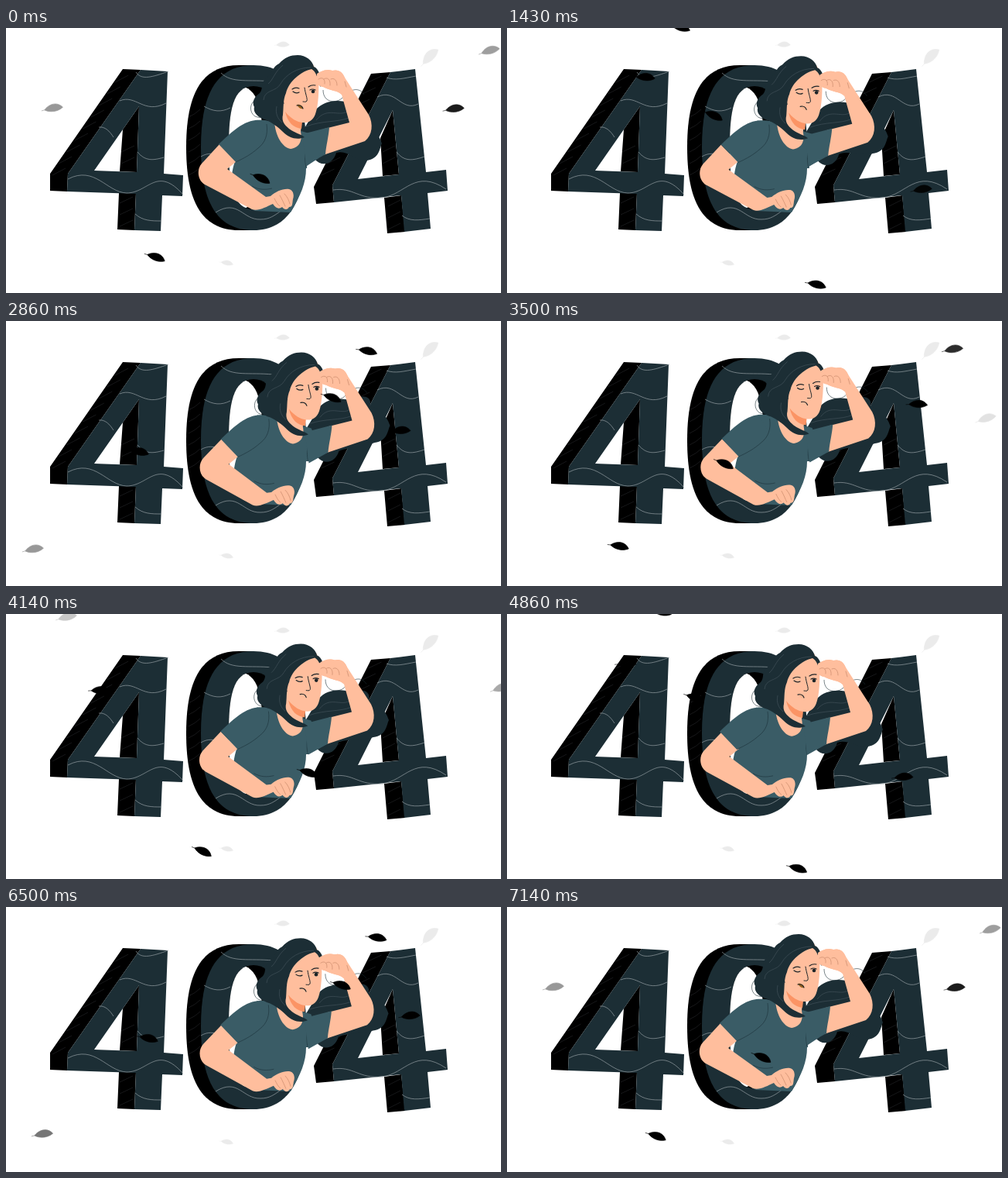
Recreate the animation shown at these times as an HTML page. Size 640x342 px, loop 7210 ms.

```html
<!DOCTYPE html>
<html lang="en">
<head>
<meta charset="utf-8">
<title>404</title>
<style>
html, body { margin: 0; width: 100%; height: 100%; overflow: hidden; background: #fff; }
svg { display: block; width: 640px; height: 342px; }
.front { fill: #1c2e35; }
.wave { fill: none; stroke: #95a0a4; stroke-width: .7; }
.grain { fill: none; stroke: #25282a; stroke-width: .6; }
.shirt { fill: #3a5c66; }
.skin { fill: #ffbe9d; }
.fold { fill: none; stroke: #20373f; stroke-width: .7; }
.crease { fill: none; stroke: #c98a6c; stroke-width: .7; stroke-linecap: round; }
.ink { fill: none; stroke: #1c2428; stroke-width: 1.2; stroke-linecap: round; }
.wisp { fill: none; stroke: #1c2e35; stroke-width: .6; }
.strand { fill: none; stroke: #47575e; stroke-width: .6; }
.pale { fill: #ebebeb; stroke: #ebebeb; }
</style>
</head>
<body>
<svg viewBox="0 0 640 342">
  <defs>
    <path id="leaf" d="M-16,2L-12,1.5C-6,-5 5,-8 12,1C5,6 -5,6 -12,1.5" stroke-width=".6"/>
    <path id="oval" d="M320,48C372,48 388,92 388,154C388,217 368,261 320,261C268,261 252,217 252,154C252,92 268,48 320,48Z"/>
    <path id="hole" d="M320,75C347,75 352,108 352,154C352,202 347,234 320,234C293,234 288,202 288,154C288,108 293,75 320,75Z"/>
    <clipPath id="inside"><use href="#hole"/></clipPath>
    <clipPath id="waist"><path d="M240,90H440V180L388,181C388,200 381,216 368,238L322,236C300,225 290,205 288,172H240Z"/></clipPath>
  </defs>

  <g class="pale">
    <use href="#leaf" transform="translate(358 21) scale(.7)"/>
    <use href="#leaf" transform="translate(548 36) rotate(-42) scale(1.1 1.25)"/>
    <use href="#leaf" transform="translate(286 303) rotate(12) scale(.65)"/>
  </g>

  <g id="left4">
    <path d="M151,53L174,54L80,188L79,211L57,210V188Z M151,131L172,101L169,186L147,185Z M146,213H168L166,261L144,260Z"/>
    <path class="front" fill-rule="evenodd" d="M174,54L209,56L204,188L229,190L228,217L202,216L200,262L166,261L168,214L79,211L80,188Z M172,101L114,184L169,186Z"/>
    <path class="wave" d="M168,57C175,68 190,63 210,56M147,94C168,85 178,112 207,97M120,128C128,127 134,133 139,141M170,160C180,172 190,171 204,167M80,195C115,177 130,212 156,213C184,213 195,177 229,215M167,240C177,249 188,249 201,249"/>
  </g>

  <g id="zero">
    <use href="#oval" x="-19"/>
    <path d="M301,48H320V261H301Z"/>
    <use href="#oval" class="front"/>
    <use href="#hole"/>
    <g clip-path="url(#inside)"><use href="#hole" x="-20" fill="#fff"/></g>
    <path class="wave" d="M278,58C292,72 314,66 345,69M256,101C268,108 278,109 290,103M252,166C260,161 270,161 277,166M271,238C300,220 306,248 329,247C341,247 347,242 357,235"/>
  </g>

  <g id="right4">
    <path d="M472,59L497,57L422,203L424,225L401,227L398,205Z M484,142L500,106L508,189L487,191Z M489,219L511,216L516,263L493,265Z"/>
    <path class="front" fill-rule="evenodd" d="M497,57L529,53L543,186L569,183L571,210L545,213L549,259L515,263L511,216L424,225L422,203Z M500,106L455,195L508,189Z"/>
    <path class="wave" d="M492,64C503,68 514,65 530,62M480,89C504,77 511,109 533,98M505,160C515,173 526,171 541,166M423,209C449,205 456,222 487,219C516,215 529,181 569,208M512,242C522,250 534,248 548,246"/>
  </g>
  <path id="grain" class="grain"/>

  <path id="tail" class="front"/>
  <path id="tailLines" class="strand"/>
  <path id="curl" class="wisp"/>

  <g clip-path="url(#waist)">
    <g data-part="torso">
      <path class="shirt" d="M322,119C334,118 344,120 350,124L392,136L404,168L389,178V255H294C291,225 288,195 296,172Z"/>
      <path class="fold" d="M318,204C327,209 335,209 344,207M389,150C386,163 386,171 388,180"/>
    </g>
  </g>
  <g data-part="arm">
    <path class="skin" d="M412,130L444,122L434,86C428,80 418,81 410,76C403,75 401,70 402,66C399,60 403,57 408,57C412,53 418,54 422,55C430,53 435,57 438,64L469,112C475,124 474,138 464,146L410,164Z"/>
    <path class="shirt" d="M383,137L418,128C417,141 414,151 413,163L388,177Z"/>
  </g>
  <g data-part="torso">
    <path class="skin" d="M357,96L383,114L381,134C384,148 377,155 368,156C357,154 349,140 347,122Z"/>
  </g>
  <g data-part="low">
    <path class="skin" d="M276,150L253,175C246,183 248,197 257,202L318,234C326,237 336,231 345,227C349,233 353,234 357,231C360,235 364,235 366,231C371,231 370,226 371,221C373,215 371,209 366,208C358,207 349,211 342,217L336,218L286,182L298,172Z"/>
    <path class="crease" d="M347,220C349,224 351,228 354,230M354,216C357,221 359,226 361,230M360,214C364,218 366,223 367,227"/>
  </g>
  <g data-part="torso">
    <path class="shirt" d="M323,119C304,121 289,137 275,150L297,173C311,167 328,157 338,145Z"/>
    <path class="fold" d="M337,124C339,138 335,148 326,155C317,163 308,168 297,173"/>
  </g>
  <g data-part="head">
    <path class="wisp" d="M328,91C315,93 313,108 322,114C329,117 335,114 340,118"/>
    <path fill="#fb9465" d="M361,108C368,117 376,121 383,121L382,130C372,129 364,122 361,108Z"/>
    <path class="skin" d="M397,47L404,60C405,80 404,100 400,111C396,123 385,124 376,120C367,116 359,104 358,88C358,68 374,50 397,47Z"/>
    <path class="front" d="M377,35C388,35 396,42 398,50C404,52 408,62 407,76L404,72C403,62 400,56 395,53C382,56 366,68 362,84C358,92 359,104 358,112C356,120 360,125 366,130C374,136 380,136 386,141C376,145 366,142 358,134C351,127 345,123 337,119C326,116 319,109 321,102C317,95 322,88 328,84C333,78 329,72 335,66C345,59 344,50 353,46C360,38 368,35 377,35Z"/>
    <path class="strand" d="M394,51C376,51 362,60 355,72C349,83 334,79 333,93M358,48C347,57 346,66 339,72M350,101C348,110 351,117 357,122"/>
    <path class="ink" d="M370,79Q374,76 379,78M391,76Q395,73 400,74M371,82Q375,85 379,83M393,80Q396,78 400,80"/>
    <circle cx="397" cy="82" r="2.3" fill="#1c2428"/>
    <path class="ink" style="stroke-width:1" d="M386,77C387,85 390,91 389,94C388,96 386,95 384,95"/>
    <path id="lips" fill="#96611f" d="M376,99C380,98 384,101 384,104C380,105 378,102 376,99Z"/>
    <path class="ink" d="M376,100C380,99 383,101 384,104"/>
  </g>
  <g data-part="arm">
    <path class="skin" d="M402,59C408,55 414,53 422,55C430,53 435,57 438,64L439,76L434,86C428,80 418,81 410,76C403,75 401,70 402,66Z"/>
    <path class="crease" d="M404,66C408,63 413,65 412,72M411,66C415,63 420,66 419,74M420,66C424,64 428,67 428,74M438,69L440,76"/>
  </g>
  <g id="leaves" stroke="#000"></g>
</svg>
<script>
const LOOP = 7210, HOLD = 500, STEP = 71.43, LAST = 94;
const CYCLE = 50, SPEED = 12.15, LIFE = 50, WAVE = 56;
const $ = id => document.getElementById(id);
const clamp = v => Math.max(0, Math.min(1, v));
const mix = (a, b, u) => a + (b - a) * u;

// key poses: phase, dip, lean
const sway = [[0, 0, 0], [17, .15, .45], [37, .6, .7], [55, .4, .6], [65, .45, 0], [78, 1, 1], [100, 0, 0]];

function pose(q) {
  const i = Math.max(1, sway.findIndex(k => k[0] >= q));
  const a = sway[i - 1], b = sway[i];
  const u = (1 - Math.cos(Math.PI * (q - a[0]) / (b[0] - a[0]))) / 2;
  return [mix(a[1], b[1], u), mix(a[2], b[2], u)];
}

function move(part, x, y, turn = 0) {
  document.querySelectorAll(`[data-part=${part}]`).forEach(e =>
    e.setAttribute('transform', `translate(${x} ${y}) rotate(${turn} 252 187)`));
}

// faint slanted grain on the dark sides of the digits
let grain = '';
for (let y = 70; y < 200; y += 15) {
  const l = 151 - .696 * (y - 53), r = 472 - .507 * (y - 59);
  grain += `M${Math.max(58, l) + 2},${y}l17,-9M${r + 2},${y}l17,-8`;
  if (y > 110) grain += `M236,${y}q9,-4 15,-10`;
  if (y > 150 && y < 182) grain += `M149,${y}l17,-8M487,${y}l16,-8`;
  grain += y < 115 ? `M147,${y + 156}l17,-8M494,${y + 160}l16,-8` : '';
}
$('grain').setAttribute('d', grain);

// every leaf drifts right at one speed along the same slow wave
const leaves = [[-3, 25, 120], [3.4, 60, 18], [8, 70, 85], [25, 27, 189], [34, 0, 311]].flatMap(([start, x, y]) =>
  [-CYCLE, 0, CYCLE].map(shift => {
    const node = document.createElementNS('http://www.w3.org/2000/svg', 'use');
    node.setAttribute('href', '#leaf');
    $('leaves').append(node);
    return { start: start + shift, x, y, node };
  }));

function drawLeaf({ start, x, y, node }, q) {
  const age = q - start, phase = 2 * Math.PI * (age - 23) / WAVE;
  const turn = 6 + 22 * Math.cos(phase);
  node.setAttribute('opacity', Math.min(clamp(age / 7.5), clamp((LIFE - age) / 9)));
  node.setAttribute('transform', `translate(${x + SPEED * age} ${y + 22 * Math.sin(phase)}) rotate(${turn})`);
}

function drawHair(hx, hy, ax, ay, x, y) {
  const p = (dx, dy) => `${x + dx},${y + dy}`;
  const a = (px, py) => `${px + ax},${py + ay}`;
  const h = (px, py) => `${px + hx},${py + hy}`;
  $('tail').setAttribute('d', `M${h(383, 134)}L${h(400, 106)}C${a(412, 92)} ${a(432, 92)} ${a(445, 97)}` +
    `C${p(-38, -42)} ${p(-22, -38)} ${p(-26, -26)}C${p(-16, -22)} ${p(-5, -16)} ${p(0, 0)}` +
    `C${p(-3, 6)} ${p(-3, 20)} ${p(-20, 22)}C${p(-30, 26)} ${a(442, 156)} ${a(427, 161)}` +
    `C${a(423, 176)} ${a(408, 180)} ${a(399, 169)}Z`);
  $('tailLines').setAttribute('d', `M${h(401, 119)}C${a(416, 100)} ${a(432, 117)} ${a(443, 106)}` +
    `M${h(388, 127)}C${a(410, 119)} ${a(428, 122)} ${a(443, 116)}`);
  $('curl').setAttribute('d', `M${a(410, 80)}C${a(410, 97)} ${a(427, 97)} ${a(434, 91)}C${a(444, 79)} ${a(456, 75)} ${a(463, 86)}`);
}

function draw(q) {
  const [dip, lean] = pose(q);
  move('head', 7 * lean, 9 * dip);
  move('torso', 4 * lean, 4 * dip);
  move('arm', 5 * lean, 11 * dip);
  move('low', 3 * dip, 3.5 * dip, 2 * dip);
  drawHair(7 * lean, 9 * dip, 5 * lean, 11 * dip, 486 + 15 * lean, 149 - 20 * lean);
  $('lips').setAttribute('opacity', clamp(1 - 2 * Math.max(dip, lean)));
  leaves.forEach(leaf => drawLeaf(leaf, q % CYCLE));
}

// the resting pose is held, then the motion joins its cycle a little later
function tick() {
  const t = performance.now() % LOOP;
  const n = t < HOLD ? 0 : Math.min(LAST, Math.floor((t - HOLD + 5) / STEP) + 1);
  draw(n % LAST ? n + 3 : 0);
  requestAnimationFrame(tick);
}
tick();
</script>
</body>
</html>
```
